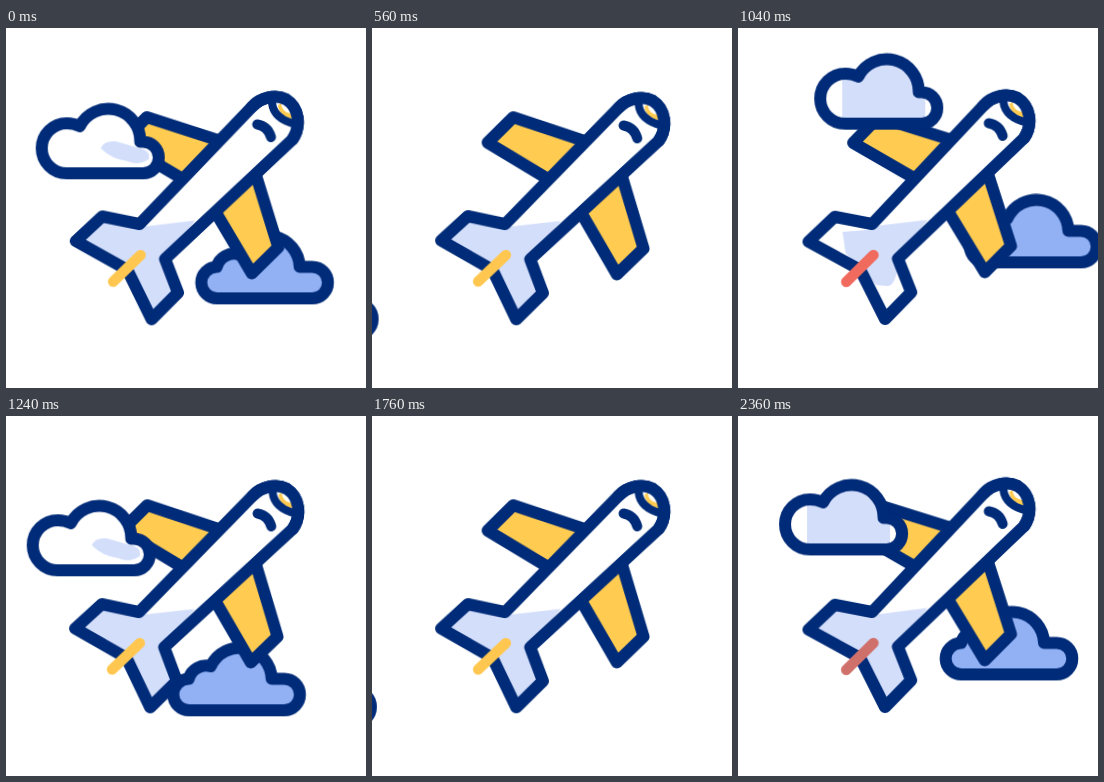
Write an HTML page that moves like this. It is 360 px wide and 360 px high and loops after 2.4 s.

```html
<!DOCTYPE html>
<html lang="en">
<head>
<meta charset="utf-8">
<title>Plane in flight</title>
<style>
  html, body { margin: 0; width: 100%; height: 100%; overflow: hidden; background: #fff; }
  svg { display: block; width: 100vw; height: 100vh; }

  .line { stroke: #002b78; stroke-width: 12; stroke-linejoin: round; stroke-linecap: round; }
  .white { fill: #fff; }
  .pale { fill: #d3defb; }
  .blue { fill: #92b1f5; }
  .gold { fill: #ffcb50; }
  .none { fill: none; }

  /* Clouds drift down-left, then re-enter from the top right. */
  .front { animation: front 2.4s linear infinite; }
  .back { animation: back 2.4s linear infinite; }
  @keyframes front {
    0% { transform: translate(30px, 151px); }
    13.333% { transform: translate(-57px, 243.5px); }
    25% { transform: translate(-133px, 324px); }
    25.01% { transform: translate(198.5px, -27.5px); }
    51.667% { transform: translate(21px, 160px); }
    63.333% { transform: translate(-57px, 242.5px); }
    75% { transform: translate(-135px, 324px); }
    75.01% { transform: translate(200px, -27px); }
    100% { transform: translate(30px, 151px); }
  }
  @keyframes back {
    0% { transform: translate(190px, 276px); }
    13.333% { transform: translate(75px, 380px); }
    21.667% { transform: translate(3px, 445px); }
    21.677% { transform: translate(401px, 74.5px); }
    33.333% { transform: translate(307px, 162px); }
    46.667% { transform: translate(200px, 266px); }
    51.667% { transform: translate(162px, 300px); }
    63.333% { transform: translate(67px, 386px); }
    71.667% { transform: translate(-1px, 447.5px); }
    71.677% { transform: translate(400px, 74px); }
    100% { transform: translate(190px, 276px); }
  }

  .plane {
    transform-origin: 130px 140px;
    animation: sway .2s cubic-bezier(.37, 0, .63, 1) -.1s infinite alternate;
  }
  @keyframes sway {
    from { transform: rotate(0deg); }
    to { transform: rotate(1.8deg); }
  }

  .streak { stroke-width: 10.5; stroke-linecap: round; animation: glow .4s step-end infinite; }
  @keyframes glow {
    0% { stroke: #ffc74f; }
    50% { stroke: #f06a5d; }
    87.5%, 100% { stroke: #d0706b; }
  }

  /* Shading swaps in step with the streak. */
  .glint { animation: early .4s step-end infinite; }
  .shade { animation: late .4s step-end infinite; }
  .tail { animation: full .4s step-end infinite; }
  .patch { animation: part .4s step-end infinite; }
  @keyframes early { 0% { opacity: 1; } 50%, 100% { opacity: 0; } }
  @keyframes late { 0% { opacity: 0; } 50%, 100% { opacity: 1; } }
  @keyframes full { 0% { opacity: 1; } 60% { opacity: 0; } 87.5%, 100% { opacity: 1; } }
  @keyframes part { 0% { opacity: 0; } 60% { opacity: 1; } 87.5%, 100% { opacity: 0; } }
</style>
</head>
<body>
<svg viewBox="0 0 360 360">
  <defs>
    <path id="puff" d="M31-6A25 25 0 0 1 31-56Q38-56 44-53A32 32 0 0 1 104.5-37.5H107.3A15.75 15.75 0 0 1 107.3-6Z"/>
    <path id="body" d="M134.5 196L245 77C254 67 268 64 279 69C292 77 295 95 286 109L160.5 230.5L174 264L148 291L123 242L71 214L97 189Z"/>
    <clipPath id="inPuff"><use href="#puff"/></clipPath>
  </defs>

  <g class="back">
    <path class="line blue" d="M21.75-6A15.75 15.75 0 0 1 21-37.5A18 18 0 0 1 43-50A32 32 0 0 1 104-37.5H116.5A15.75 15.75 0 0 1 116.5-6Z"/>
  </g>

  <g class="plane">
    <path class="line gold" d="M212 111L140 89L115 115L180 152"/>
    <path class="line gold" d="M211 184L247.5 243.5L273.5 217L250 145"/>
    <use href="#body" class="white"/>
    <path class="pale tail" d="M135 199L190 191.5L160.5 230.5L174 264L148 291L123 242L71 214L97 189Z"/>
    <path class="pale patch" d="M105 204L129 202Q138 198 145 197L190 191.5L160.5 230.5L160 242Q157 258 150 258L139 257L123 240L108 225Z"/>
    <use href="#body" class="line none"/>
    <path class="white" d="M265 73Q267 89 290 94L286 78L276 70Z"/>
    <path class="gold" d="M271 75Q272 86 287 89L284 83Q275 82 274 73Z"/>
    <path class="line none" style="stroke-width:8" d="M265 73Q267 89 290 94"/>
    <path class="line none" d="M245 77C254 67 268 64 279 69C292 77 295 95 286 109"/>
    <path class="line none" style="stroke-width:10" d="M250.5 94.5Q261 96 264.5 107"/>
    <path class="streak none" d="M109 254L136 227"/>
  </g>

  <g class="front">
    <use href="#puff" class="white"/>
    <g clip-path="url(#inPuff)">
      <path class="pale shade" d="M28-85H111V-5H28Z"/>
      <path class="pale glint" d="M65-31Q68-39 80-38L104-31Q115-29 113-20Q102-13 92-18Q76-20 65-31Z"/>
    </g>
    <use href="#puff" class="line none"/>
  </g>
</svg>
</body>
</html>
```
